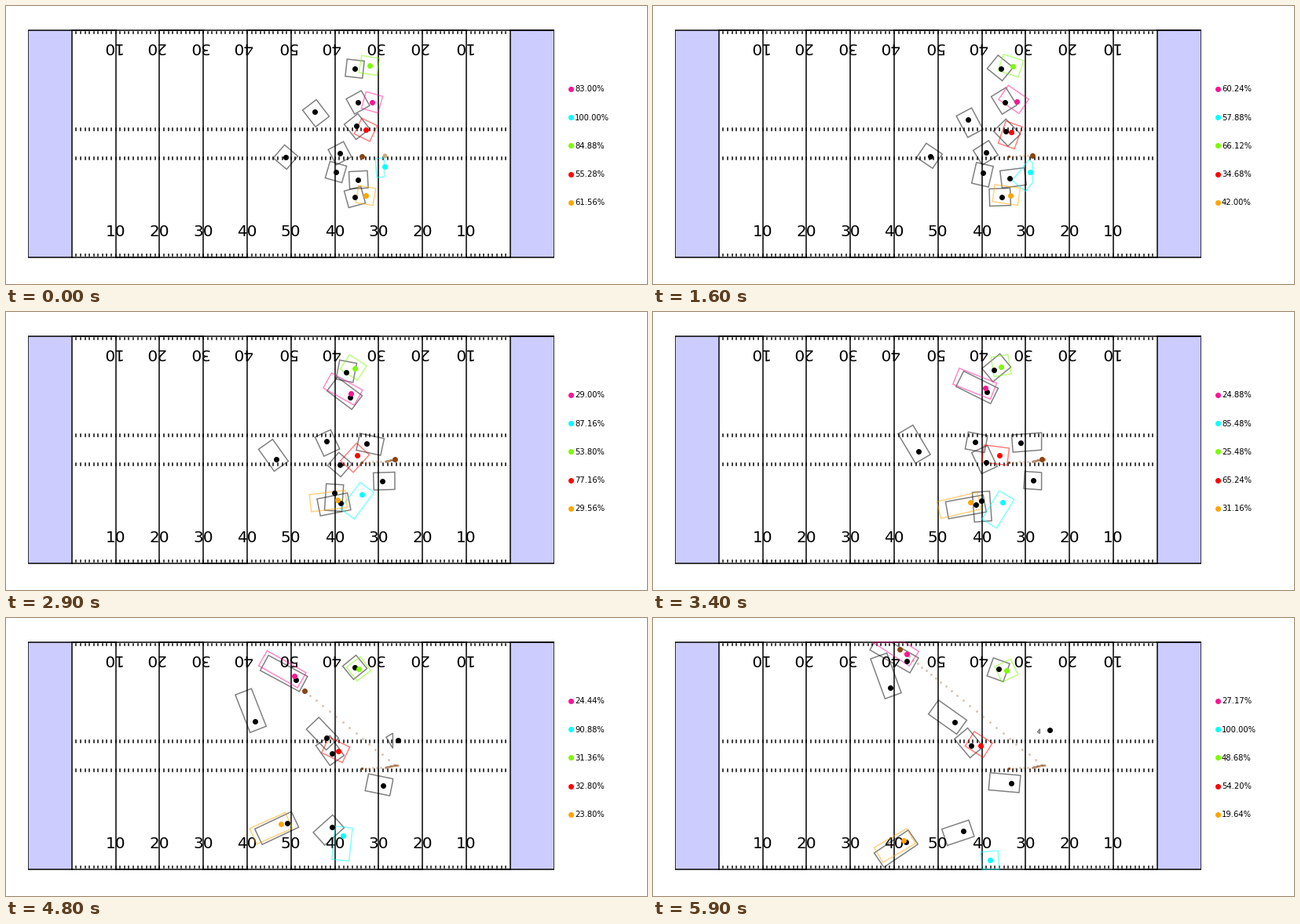
A matplotlib script for the animation above (6 s loop, 816 by 355 pixels).

```python
import numpy as np
import matplotlib.pyplot as plt
from matplotlib.animation import FuncAnimation
from matplotlib.patches import Polygon, Rectangle

W, H, DPI = 816, 355, 64
PX = 72 / DPI                     # points per pixel
FRAMES, STEP = 60, 100
KEYS = [0, 16, 29, 48, 59]        # times of the players' waypoints
TIME = np.arange(FRAMES, dtype=float)

LEFT, TOP, BOTTOM = 28, 31, 321   # field edges in pixels
YARD_X, YARD_Y = 5.58, 290 / 53.3
HALF = 11                         # half side of a resting box
LOOKAHEAD = 8                     # frames of travel a box reaches ahead
SNAP, SNAP_TIME, THROW = 9, 6, 34

rng = np.random.default_rng(4)
plt.rcParams["font.family"] = "DejaVu Sans"
fig = plt.figure(figsize=(W / DPI, H / DPI), dpi=DPI, facecolor="white")
ax = fig.add_axes([0, 0, 1, 1])
ax.set_xlim(0, W)
ax.set_ylim(H, 0)
ax.axis("off")


def field_x(yards):
    return LEFT + YARD_X * np.asarray(yards, float)


def field_y(yards):
    return BOTTOM - YARD_Y * np.asarray(yards, float)


def smooth(t, keys, values):
    """Cubic Hermite curve through the key values."""
    keys, values = np.asarray(keys, float), np.asarray(values, float)
    slope = np.gradient(values, keys)
    j = np.clip(np.searchsorted(keys, t, side="right") - 1, 0, len(keys) - 2)
    h = keys[j + 1] - keys[j]
    u = (t - keys[j]) / h
    return ((1 + 2 * u) * (1 - u) ** 2 * values[j]
            + u * (1 - u) ** 2 * h * slope[j]
            + u * u * (3 - 2 * u) * values[j + 1]
            + u * u * (u - 1) * h * slope[j + 1])


def draw_field():
    style = dict(color="black", lw=1.5 * PX, zorder=2, snap=True)

    for start in (0, 110):
        ax.add_patch(Rectangle((field_x(start), TOP), 10 * YARD_X, BOTTOM - TOP,
                               fc="#ccccff", lw=0, zorder=0))

    # One zigzag stroke over the yard lines, then around the border.
    xs = np.append(np.repeat(np.arange(10, 121, 10), 2)[:-1], [0, 0, 120, 120])
    ys = np.append(np.tile([0, 53.3, 53.3, 0], 6)[:-1], [53.3, 0, 0, 53.3])
    line, = ax.plot(field_x(xs), field_y(ys), **style)
    line.set_clip_path(Rectangle((LEFT, 0), 120 * YARD_X, H, transform=ax.transData))

    marks = field_x(np.arange(11, 110))
    for low, high in ((0.4, 0.7), (52.5, 53.0), (22.91, 23.57), (29.73, 30.39)):
        x = np.column_stack([marks, marks, marks * np.nan]).ravel()
        y = np.tile([field_y(low), field_y(high), np.nan], len(marks))
        ax.plot(x, y, **style)

    font = dict(ha="center", fontsize=20 * PX, color="black", zorder=3)
    for yard in range(20, 110, 10):
        label = str(min(yard, 120 - yard) - 10)
        ax.text(field_x(yard), field_y(5), label, **font)
        ax.text(field_x(yard - 0.95), field_y(48.3), label, rotation=180, **font)


def dot(color, size=7, zorder=5, **kw):
    return ax.plot([], [], "o", ms=size * PX, mew=0, color=color, zorder=zorder, **kw)[0]


def clip(points, axis, limit, sign):
    """Keep the part of a polygon where sign * (coordinate - limit) <= 0."""
    kept = []
    for a, b in zip(points, points[1:] + points[:1]):
        da, db = sign * (a[axis] - limit), sign * (b[axis] - limit)
        if da <= 0:
            kept.append(a)
        if da * db < 0:
            kept.append(a + (b - a) * da / (da - db))
    return kept


class Player:
    """A dot with a box that turns and stretches with its velocity."""

    def __init__(self, color, facing, *waypoints):
        self.color = color
        x, y = np.array(waypoints, float).T
        self.path = np.column_stack([smooth(TIME, KEYS, x), smooth(TIME, KEYS, y)])
        velocity = np.gradient(self.path, axis=0)
        self.front = HALF + LOOKAHEAD * np.maximum(np.hypot(*velocity.T) - 0.15, 0)

        # A standing player looks around; a running one faces its way.
        look = np.radians(facing + 20 * np.sin(TIME * rng.uniform(-0.25, 0.25)))
        turn = velocity + 0.3 * np.column_stack([np.cos(look), np.sin(look)])
        self.ahead = turn / np.hypot(*turn.T)[:, None]
        self.side = self.ahead[:, ::-1] * [-1, 1]

        self.box = ax.add_patch(Polygon([[0, 0], [1, 1]], fill=False, ec=color,
                                        lw=1.5 * PX, alpha=0.5, zorder=4))
        self.dot = dot(color, zorder=5 if color == "black" else 6)

    def point(self, i, a, b):
        return self.path[i] + a * self.ahead[i] + b * self.side[i]

    def covers(self, i, points):
        offset = points - self.path[i]
        a, b = offset @ self.ahead[i], offset @ self.side[i]
        return (a > -HALF) & (a < self.front[i]) & (abs(b) < HALF)

    def open_share(self, i, rivals):
        """Percentage of the visible box that no rival box covers."""
        a, b = np.meshgrid(np.linspace(-HALF, self.front[i], 50),
                           np.linspace(-HALF, HALF, 50))
        points = self.point(i, a.reshape(-1, 1), b.reshape(-1, 1))
        x, y = points.T
        points = points[(x < passer_x[i]) & (y > TOP) & (y < BOTTOM)]
        covered = np.any([r.covers(i, points) for r in rivals], axis=0)
        return 100 * (1 - covered.mean()) if len(points) else 100

    def update(self, i):
        front = self.front[i]
        shape = [self.point(i, a, b) for a, b in
                 ((-HALF, -HALF), (front, -HALF), (front, HALF), (-HALF, HALF))]
        for axis, limit, sign in ((0, passer_x[i], 1), (1, TOP, -1), (1, BOTTOM, 1)):
            shape = clip(shape, axis, limit, sign)
        self.box.set_visible(len(shape) > 2)
        if len(shape) > 2:
            self.box.set_xy(shape)
        self.dot.set_data(*self.path[i][:, None])


draw_field()

# Resting direction in degrees, then the waypoints.
defence = [Player("black", *route) for route in (
    (4, (444, 80), (443, 80), (433, 77), (444, 63), (440, 65)),
    (240, (448, 123), (448, 123), (438, 109), (369, 79), (323, 55)),
    (59, (393, 135), (401, 145), (408, 165), (408, 153), (384, 133)),
    (234, (356, 193), (353, 192), (344, 188), (317, 132), (302, 89)),
    (25, (446, 153), (449, 160), (459, 168), (499, 156), (505, 143)),
    (246, (425, 188), (424, 187), (425, 195), (415, 173), (405, 163)),
    (108, (420, 212), (420, 213), (418, 231), (415, 267), (395, 272)),
    (17, (448, 222), (454, 220), (479, 216), (480, 214), (456, 211)),
    (167, (444, 244), (444, 244), (426, 244), (358, 262), (322, 286)),
)]
receivers = [
    Player("deeppink", 199, (466, 123), (463, 122), (439, 104), (367, 74), (323, 46)),
    Player("cyan", 67, (482, 205), (480, 212), (453, 233), (429, 278), (429, 309)),
    Player("lawngreen", 213, (463, 76), (458, 77), (444, 72), (449, 65), (450, 67)),
    Player("red", 109, (458, 158), (456, 161), (447, 183), (423, 170), (417, 163)),
    Player("orange", 194, (458, 242), (455, 242), (422, 240), (350, 263), (319, 284)),
]

# The ball is snapped to the passer, carried back and thrown.
passer_x = np.interp(TIME, [0, 7, 16, 29, 32, 35], [481.5, 479.5, 483, 495, 499, 492.4])
passer_y = np.interp(TIME, [16, 29], [190.5, 188])
reach = np.clip((TIME - SNAP) / SNAP_TIME, 0, 1)
flight = [THROW, 39, 48, 59]
ball_x = np.where(TIME < THROW, 453 + reach * (passer_x - 453),
                  smooth(TIME, flight, [495, 454, 380, 314]))
ball_y = np.where(TIME < THROW, 192 + reach * (passer_y - 192),
                  smooth(TIME, flight, [188, 154, 93, 40]))

trail = [dot("saddlebrown", 3, 4, alpha=0.3) for _ in range(FRAMES)]
for mark, x, y in zip(trail, ball_x, ball_y):
    mark.set_data([x], [y])
passer = dot("#c8ab78", 6)
ball = dot("saddlebrown", 7, 7)

labels = []
for row, receiver in enumerate(receivers):
    y = 105.8 + 36.25 * row
    dot(receiver.color).set_data([719.3], [y])
    labels.append(ax.text(724, y + 3.5, "", fontsize=10 * PX, color="black"))


def update(i):
    for player in defence + receivers:
        player.update(i)
    for label, receiver in zip(labels, receivers):
        label.set_text(f"{receiver.open_share(i, defence):.2f}%")
    for n, mark in enumerate(trail):
        mark.set_visible(n < i)
    passer.set_data([passer_x[i]], [passer_y[i]])
    passer.set_visible(i < SNAP + SNAP_TIME)
    ball.set_data([ball_x[i]], [ball_y[i]])
    return []


anim = FuncAnimation(fig, update, frames=FRAMES, interval=STEP,
                     init_func=lambda: update(0), repeat=True, repeat_delay=0)
plt.show()
```
